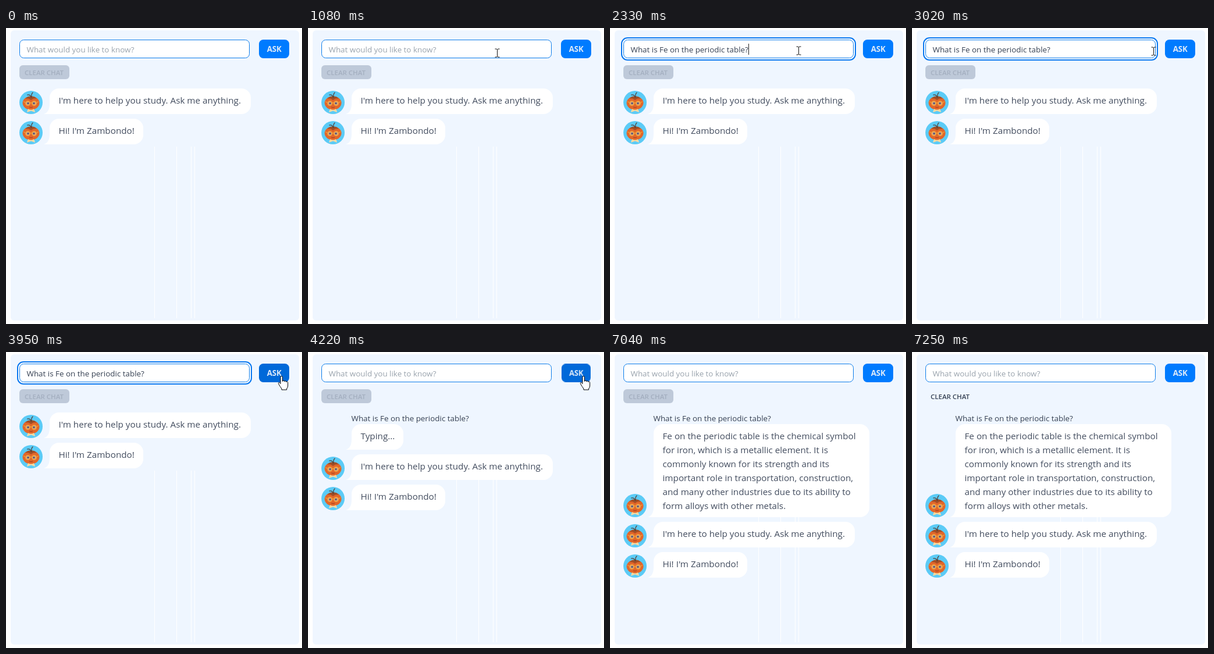
Write an HTML page that moves like this. It is 509 by 509 pixels and loops after 8000 ms.

```html
<!DOCTYPE html>
<html lang="en">
<head>
<meta charset="utf-8">
<title>Study chat</title>
<style>
html, body { margin: 0; width: 100%; height: 100%; overflow: hidden; background: #fff; }
svg { display: block; width: 100vw; height: 100vh; }
text { font: 15.25px "Open Sans", "Noto Sans", sans-serif; fill: #434d5f; white-space: pre; }
.small { font-size: 13.4px; fill: #364153; }
.hint { fill: #99a3ad; }
.ask-label { font-size: 13.3px; font-weight: 700; fill: #dfebf9; }
.clear-label { font-size: 11.5px; font-weight: 600; }
.bubble { fill: #fff; }

/* Hard switches by default; smooth parts override the timing. */
.anim { animation: 8s step-end infinite; }
.smooth { animation-timing-function: linear; }

.hint { animation-name: hint; }
.value { animation-name: value; }
.caret { animation-name: caret; }
.ring { animation-name: ring; }
.ask { animation-name: press; transform-box: fill-box; transform-origin: center; }
.ask-face { animation-name: hover; }
.clear-face { animation-name: clear-face; }
.clear-label { animation-name: clear-label; }
.intro { animation-name: intro; }
.question { animation-name: question; }
.typing { animation-name: typing; }
.answer { animation-name: answer; }
.reply-face { animation-name: reply-face; }
.pointer { animation-name: pointer; }
.arrow { animation-name: arrow; }
.ibeam { animation-name: ibeam; }
.hand { animation-name: hand; }

@keyframes hint { 0%, 52.5% { opacity: 1 } 29.125% { opacity: 0 } }
@keyframes value { 0%, 52.5% { opacity: 0 } 29.125% { opacity: 1 } }
@keyframes caret {
  0%, 22.625% { opacity: 0; transform: none }
  15% { opacity: 1; transform: none }
  29.125%, 42.75% { opacity: 1; transform: translateX(202px) }
  35.125%, 49.375% { opacity: 0; transform: translateX(202px) }
}
@keyframes ring { 0%, 15%, 52.5%, 100% { opacity: 0 } 16.75%, 51% { opacity: 1 } }
@keyframes press { 0%, 51%, 55.4%, 100% { transform: none } 52.4%, 53.2% { transform: scale(.97) } }
@keyframes hover { 0%, 38.5%, 67.375%, 100% { fill: #007bff } 40.25%, 63.875% { fill: #0069d9 } }
@keyframes clear-face { 0%, 88% { opacity: 1 } 90.625%, 100% { opacity: 0 } }
@keyframes clear-label { 0%, 88% { fill: #a4afc0 } 90.625%, 100% { fill: #364153 } }
@keyframes intro { 0% { transform: none } 52.5% { transform: translateY(72px) } 88% { transform: translateY(188px) } }
@keyframes question { 0% { opacity: 0 } 52.5% { opacity: 1 } }
@keyframes typing { 0%, 88% { opacity: 0 } 52.5% { opacity: 1 } }
@keyframes answer { 0% { opacity: 0 } 88% { opacity: 1 } }
@keyframes reply-face {
  0% { opacity: 0; transform: none }
  56.125% { opacity: 1; transform: none }
  88% { opacity: 1; transform: translateY(116px) }
}
@keyframes pointer {
  0% { transform: translate(497px, 483px) }
  4.875% { transform: translate(497px, 483px); animation-timing-function: steps(3) }
  7.4375% { transform: translate(440px, 300px); animation-timing-function: steps(3) }
  10% { transform: translate(385px, 150px); animation-timing-function: steps(3) }
  12.5625% { transform: translate(340px, 60px) }
  13.42% { transform: translate(325px, 43px) }
  14.25% { transform: translate(324px, 39px) }
  35.125% { transform: translate(334px, 39px); animation-timing-function: steps(3) }
  37.6875% { transform: translate(415px, 40px); animation-timing-function: steps(3) }
  40.25%, 100% { transform: translate(474px, 42px) }
}
@keyframes arrow { 0%, 13.42% { opacity: 0 } 4.875% { opacity: 1 } }
@keyframes ibeam { 0%, 38.5% { opacity: 0 } 13.42% { opacity: 1 } }
@keyframes hand { 0%, 63.875% { opacity: 0 } 38.5% { opacity: 1 } }
</style>
</head>
<body>
<svg viewBox="0 0 509 509">
  <defs>
    <g id="face">
      <circle r="20" fill="#5bcbf6"/>
      <path d="M-5 10L-7 17 0 14.5 7 17 5 10Z" fill="#f3dcb4"/>
      <ellipse cy="1" rx="14.5" ry="11.5" fill="#e2662a"/>
      <path d="M-10-7Q-4-12 0-10 5-12 10-7L4-6.5 0-4-4-6.5Z" fill="#a14d25"/>
      <path d="M0-9Q-1-14-6-13M1-9Q0-14 3-17" fill="none" stroke="#56433a" stroke-width="1.3" stroke-linecap="round"/>
      <g fill="#dfa577" stroke="#f0a03a" stroke-width="1.4">
        <circle cx="-5.5" cy="1.5" r="3.8"/>
        <circle cx="5.5" cy="1.5" r="3.8"/>
        <path d="M-1.5 1Q0 0 1.5 1M-9.3 .5L-13-1.5M9.3 .5L13-1.5" fill="none"/>
      </g>
      <g fill="#525578"><circle cx="-5" cy="1.5" r="1.7"/><circle cx="5" cy="1.5" r="1.7"/></g>
      <path d="M-3 8Q0 9.5 3 8" fill="none" stroke="#9c3c1e"/>
      <path d="M0 13.5L-5 11V16ZM0 13.5L5 11V16Z" fill="#f7d898"/>
    </g>
    <path id="tail" d="M-10 0Q0-3 0-18H16V0Z"/>
  </defs>

  <rect x="8" y="4" width="496" height="499" rx="6" fill="#eff6ff"/>
  <path d="M255.5 204V499M293.5 204V499M318.5 204V499M324.5 204V499" stroke="#fff"/>

  <g class="ring anim smooth">
    <rect x="20" y="17" width="402" height="38" rx="10" fill="#fff" stroke="#0a78f0" stroke-width="2"/>
  </g>
  <rect x="23.5" y="20.5" width="395" height="31" rx="7" fill="#fff" stroke="#0a7bea"/>
  <text class="small hint anim" x="35.5" y="42">What would you like to know?</text>
  <text class="small value anim" x="35.5" y="42">What is Fe on the periodic table?</text>
  <rect class="caret anim" x="36" y="27" width="1" height="19" fill="#222"/>

  <g class="ask anim smooth">
    <rect class="ask-face anim smooth" x="435" y="20" width="52" height="32" rx="7.5" fill="#007bff"/>
    <text class="ask-label" x="461.3" y="41" text-anchor="middle">ASK</text>
  </g>

  <rect class="clear-face anim smooth" x="23" y="64" width="86" height="24" rx="6" fill="#bec9d9"/>
  <text class="clear-label anim smooth" x="65.5" y="81" text-anchor="middle">CLEAR CHAT</text>

  <text class="small question anim" x="74.5" y="119">What is Fe on the periodic table?</text>

  <g class="typing anim">
    <g class="bubble"><rect x="75" y="124" width="89" height="44" rx="16"/><use href="#tail" x="75" y="168"/></g>
    <text x="90.5" y="150">Typing...</text>
  </g>

  <g class="answer anim">
    <g class="bubble"><rect x="75" y="124" width="371" height="160" rx="16"/><use href="#tail" x="75" y="284"/></g>
    <text y="150">
      <tspan x="90.5">Fe on the periodic table is the chemical symbol</tspan>
      <tspan x="90.5" dy="24">for iron, which is a metallic element. It is</tspan>
      <tspan x="90.5" dy="24">commonly known for its strength and its</tspan>
      <tspan x="90.5" dy="24">important role in transportation, construction,</tspan>
      <tspan x="90.5" dy="24">and many other industries due to its ability to</tspan>
      <tspan x="90.5" dy="24">form alloys with other metals.</tspan>
    </text>
  </g>
  <g class="reply-face anim"><use href="#face" x="43" y="148"/></g>

  <g class="intro anim">
    <g class="bubble">
      <rect x="75" y="104" width="346" height="44" rx="16"/><use href="#tail" x="75" y="148"/>
      <rect x="75" y="156" width="161" height="44" rx="16"/><use href="#tail" x="75" y="200"/>
    </g>
    <use href="#face" x="43" y="128"/>
    <use href="#face" x="43" y="180"/>
    <text x="90.5" y="130">I'm here to help you study. Ask me anything.</text>
    <text x="90.5" y="182">Hi! I'm Zambondo!</text>
  </g>

  <g class="pointer anim">
    <path class="arrow anim" d="M0 0V16L3.8 12.4 6.4 18.4 8.9 17.3 6.3 11.4H11.5Z" fill="#fff" stroke="#000"/>
    <path class="ibeam anim" d="M-3.5-7H-1L.5-6 2-7H4.5M.5-6V6M-3.5 7H-1L.5 6 2 7H4.5" fill="none" stroke="#111"/>
    <path class="hand anim" d="M-2 1.2a1.7 1.7 0 0 1 3.4 0V8.5q.3-1.6 1.8-1.4 1.5.2 1.6 1.7.3-1.2 1.6-1 1.5.2 1.5 1.8.3-.9 1.4-.8 1.4.2 1.4 1.8V16q0 3-2 5v2H0v-2q-2.5-3-5.5-8.5-.6-1.7.8-2 1.3-.2 2.7 2z" fill="#fff" stroke="#000" stroke-linejoin="round"/>
  </g>
</svg>
</body>
</html>
```
